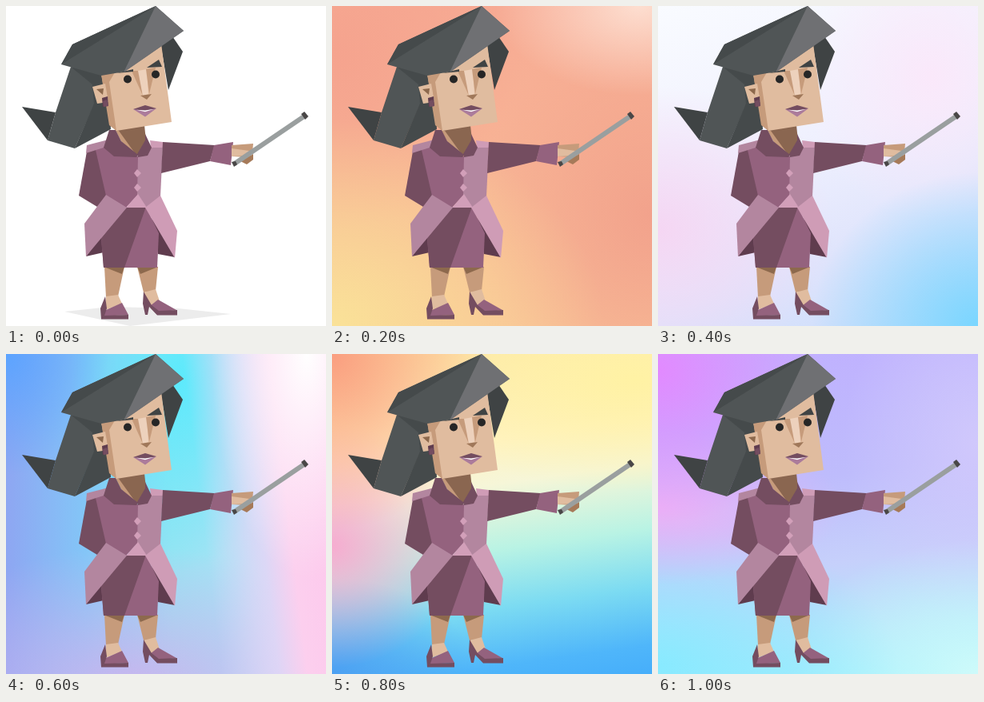
An HTML page for the animation above (1.2 s loop, 400 by 400 pixels).

```html
<!DOCTYPE html>
<html lang="en">
<head>
<meta charset="utf-8">
<title>Pointing woman on changing colours</title>
<style>
  html, body { margin: 0; width: 100%; height: 100%; overflow: hidden; }
  #stage { position: relative; width: 100vw; height: 100vh; background: #fff; }
  svg { display: block; width: 100%; height: 100%; }
</style>
</head>
<body>
<div id="stage">
<svg viewBox="0 0 400 400">
  <polygon id="shadow" fill="#ececec" points="73,382 130,376 215,378 281,385 155,400"/>

  <g id="legs">
    <polygon fill="#c69b7b" points="123,326 148,326 140,363 125,364"/>
    <polygon fill="#c69b7b" points="164,326 190,326 187,356 172,358"/>
    <polygon fill="#8d694d" points="122,326 148,326 145,335"/>
    <polygon fill="#8d694d" points="164,326 190,326 168,335"/>
    <polygon fill="#e0bc9f" points="125,363 140,361 145,372 124,380"/>
    <polygon fill="#e0bc9f" points="172,358 187,354 192,369 181,376"/>
    <polygon fill="#94627e" points="125,380 145,371 153,386 119,388 121,379"/>
    <polygon fill="#744d60" points="124,363 118,378 119,391.500 153,391.500 153,386 123,387 126,378"/>
    <polygon fill="#94627e" points="180,375 190,367 213,380 190,383"/>
    <polygon fill="#744d60" points="172,357 171,372 174,386 177,386 179,376 189,386.500 214,386.500 214,380 191,381 182,374"/>
  </g>

  <g id="skirt">
    <polygon fill="#5f3c4e" points="100,313 120,286 122,308"/>
    <polygon fill="#5f3c4e" points="182,264 211,314 190,310"/>
    <polygon fill="#94627e" points="150,251 175,251 191,284 189,327 122,327 119,290"/>
    <polygon fill="#744d60" points="150,251 175,251 148,327 122,327 119,290"/>
  </g>

  <g id="jacket">
    <polygon fill="#744d60" points="101,182 114,179 126,237 114,251 91,237"/>
    <polygon fill="#94627e" points="112,180 123,175 165,188 165,236 150,252 125,237"/>
    <polygon fill="#b3869f" points="165,188 181,176 196,176 193,238 175,252 164,238"/>
    <polygon fill="#b3869f" points="101,174 128,167 122,177 100,184"/>
    <polygon fill="#cf9cb6" points="180,168 196,170 196,177 181,177"/>
    <polygon fill="#d29fb9" points="165,235 176,252 150,252"/>
    <polygon fill="#d29fb9" points="164,204 169,209 164,214 160,209"/>
    <polygon fill="#d29fb9" points="164,222 169,227 164,232 160,227"/>
    <polygon fill="#b3869f" points="125,236 151,252 100,313 98,272"/>
    <polygon fill="#cf9cb6" points="193,237 174,252 211,315 214,281"/>
    <polygon fill="#8a6650" points="137,155 173,149 175,168 164,188 145,170"/>
    <polygon fill="#c69b7b" points="137,155 141,156 164,188 144,169"/>
    <polygon fill="#744d60" points="129,155 137,155 144,169 165,186 163,189 135,188 122,177"/>
    <polygon fill="#744d60" points="174,160 182,177 177,187 165,189 164,185 174,168"/>
  </g>

  <g id="arm">
    <polygon fill="#744d60" points="196,170 261,174 255,194 194,209"/>
    <polygon fill="#94627e" points="260,174 284,170 281,199 255,194"/>
    <polygon fill="#c69b7b" points="282,174 309,172 308,184 303,189 282,188"/>
    <polygon fill="#e0bc9f" points="282,178 304,181 301,187 282,188"/>
    <polygon fill="#a67a59" points="293,194 309,185 309,192 301,198"/>
    <path d="M285 197.500L374 137" stroke="#9a9f9f" stroke-width="6"/>
    <polygon fill="#494747" points="369,135 373,132 378,138 374,142"/>
    <polygon fill="#494747" points="282,195 287,194 289,198 285,201"/>
  </g>

  <g id="head">
    <polygon fill="#3f4344" points="193,46 208,38 221,57 203,105"/>
    <polygon fill="#505556" points="81,76 62,133 52,168 86,178 110,124 119,86"/>
    <polygon fill="#454a4b" points="81,76 120,84 108,98"/>
    <polygon fill="#3f4344" points="20,126 62,133 52,168"/>
    <polygon fill="#454a4b" points="86,178 110,122 108,98 119,84 128,90 131,154"/>
    <polygon fill="#e0bc9f" points="119,85 150,70 194,47 207,145 138,156 131,150"/>
    <polygon fill="#c69b7b" points="119,85 136,83 129,95 138,156 129,149 124,118"/>
    <polygon fill="#e0bc9f" points="108,101 124,97 128,120 114,122"/>
    <polygon fill="#8d694d" points="113,104 122,103 121,111"/>
    <polygon fill="#5f3c4e" points="120,115 127,113 128,125 121,126"/>
    <polygon fill="#744d60" points="121,119 126,117 128,125 122,126"/>
    <polygon fill="#c69b7b" points="157,81 166,81 171,112"/>
    <polygon fill="#edd1bc" points="165,81 176,79 178,110 171,112"/>
    <polygon fill="#c69b7b" points="175,79 187,77 179,110"/>
    <polygon fill="#a0785a" points="168,112 182,110 176,117"/>
    <g fill="#262626">
      <circle cx="152" cy="91.500" r="5"/>
      <circle cx="187" cy="85.500" r="5"/>
    </g>
    <polygon fill="#3f4344" points="138,84 159,79 159,82"/>
    <polygon fill="#3f4344" points="176,77 191,67 195,76"/>
    <polygon fill="#ab7b9b" points="159,129 188,128 174,138.500"/>
    <polygon fill="#744d60" points="159,129 174,124 188,128 174,131"/>
    <polygon fill="#fff" points="163,129.800 174,130.500 185,128.800 174,132.200"/>
    <polygon fill="#505556" points="187,0 222,31 148,82 119,87 69,73 83,48"/>
    <polygon fill="#454a4b" points="187,0 83,48 69,73"/>
    <polygon fill="#6f7073" points="187,0 222,31 147,83"/>
  </g>
</svg>
</div>
<script>
  const STEP = 200;
  const stage = document.getElementById('stage');
  const shadow = document.getElementById('shadow');

  // Soft colour spot: centre and radii in percent, fading to nothing.
  const spot = (x, y, rx, ry, rgb, alpha = 1) =>
    `radial-gradient(${rx}% ${ry}% at ${x}% ${y}%, rgba(${rgb},${alpha}), ` +
    `rgba(${rgb},${alpha * 0.5}) 50%, rgba(${rgb},0))`;
  const ramp = (angle, ...stops) => `linear-gradient(${angle}deg, ${stops.join(', ')})`;

  const scenes = [
    '#fff',
    [
      spot(96, 0, 45, 28, '253,222,208'),
      spot(0, 100, 85, 65, '250,226,152'),
      spot(100, 65, 55, 60, '242,162,140'),
      spot(0, 15, 60, 55, '245,163,142'),
      ramp(180, '#f7ab94', '#f8bd96')
    ],
    [
      spot(100, 100, 52, 48, '122,214,255'),
      spot(0, 70, 55, 45, '245,214,243'),
      spot(85, 22, 40, 45, '250,232,250'),
      ramp(160, '#f9fbff', '#eff0fe 45%', '#dfe4fc 72%', '#c8dcfb')
    ],
    [
      spot(94, 0, 30, 70, '255,255,255'),
      ramp(83, 'rgba(214,214,248,0) 60%', 'rgba(226,214,246,.85) 76%', '#fccfee 84%', '#fdc6ec'),
      spot(40, 106, 75, 46, '204,180,238'),
      spot(0, 0, 32, 38, '92,164,255'),
      spot(54, 8, 34, 60, '92,234,252'),
      ramp(90, '#8ea6f2', '#83c6f7 25%', '#98e4f2 52%', '#a9e2f6 72%', '#d8dcf8')
    ],
    [
      spot(0, 0, 50, 55, '250,158,128'),
      spot(0, 60, 40, 38, '246,172,208'),
      spot(0, 100, 45, 30, '76,160,242'),
      spot(95, 8, 75, 35, '255,242,164'),
      ramp(172, '#fde6a4', '#fff3c4 30%', '#f6f6d8 42%', '#b9f3e4 60%', '#7cdbf2 76%', '#4fb6fa 92%', '#46aefa')
    ],
    [
      spot(0, 5, 52, 48, '226,138,255'),
      spot(0, 48, 58, 24, '236,178,246'),
      spot(0, 98, 75, 46, '136,234,255'),
      spot(100, 100, 60, 42, '206,250,250'),
      spot(100, 28, 42, 55, '208,200,252'),
      ramp(172, '#c0b0ff', '#bebcfc 40%', '#c6d0fb 64%', '#b4e4fb 84%', '#9cf2fe')
    ]
  ].map(layers => [].concat(layers).join(','));

  let shown = -1;
  function draw(time) {
    const index = Math.floor(time / STEP) % scenes.length;
    if (index !== shown) {
      stage.style.background = scenes[index];
      shadow.style.display = index ? 'none' : '';
      shown = index;
    }
  }

  let start;
  function tick(now) {
    start ??= now;
    draw(now - start);
    requestAnimationFrame(tick);
  }
  draw(0);
  requestAnimationFrame(tick);
</script>
</body>
</html>
```
